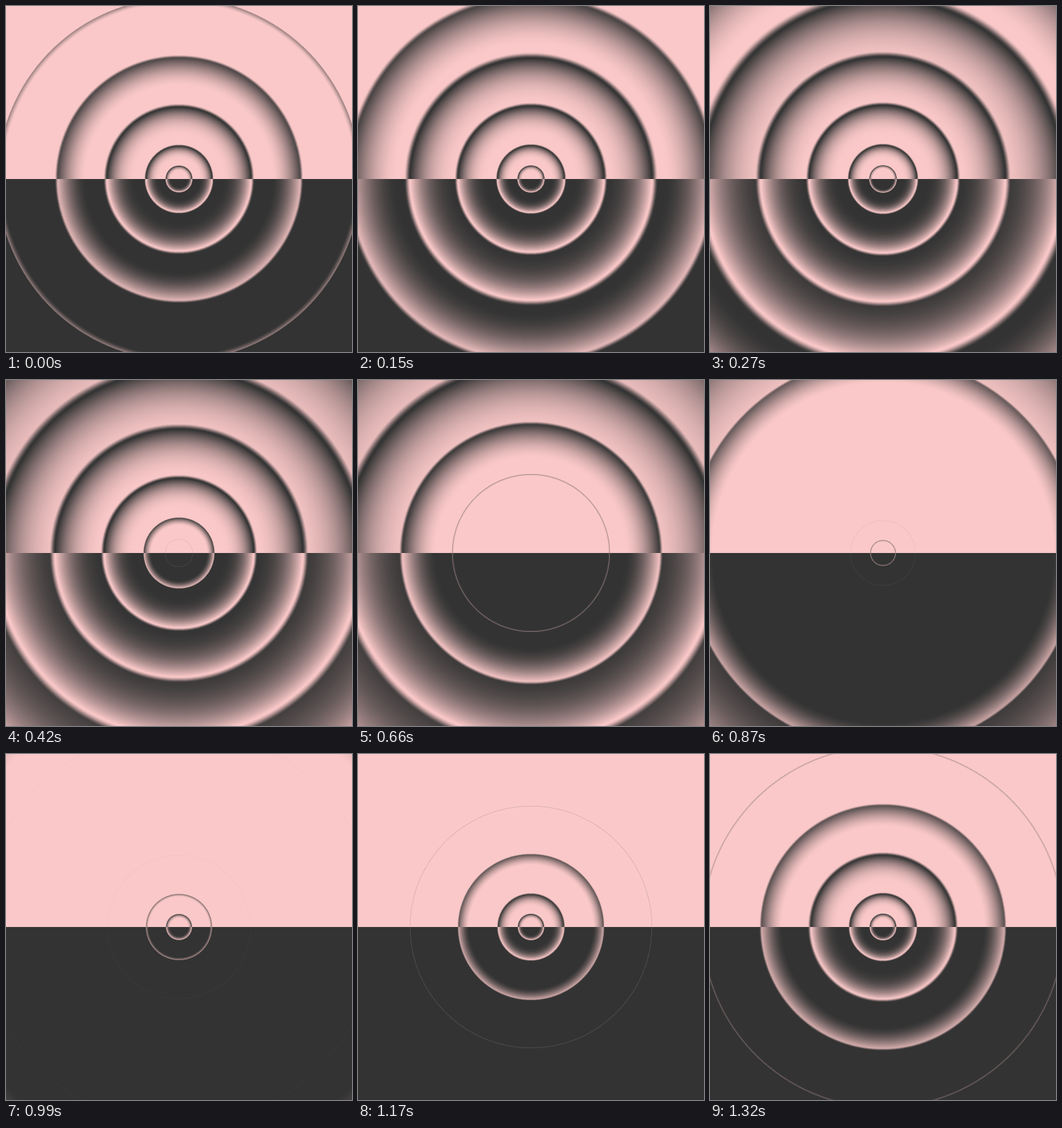
An HTML page with a canvas for the animation above (1350 ms loop, 500x500 px).

```html
<!DOCTYPE html>
<html>
<head>
<meta charset="utf-8">
<style>
html, body { margin: 0; width: 100%; height: 100%; overflow: hidden; background: #333; }
canvas { display: block; }
</style>
</head>
<body>
<canvas id="stage" width="500" height="500"></canvas>
<script>
const SIZE = 500, HALF = SIZE / 2;
const LOOP = 1350, STEP = 30, LIFE = 1080, STAGGER = 135, FIRST_BIRTH = 720;
const RADII = [18.4, 47.2, 103.9, 174.3, 260, 370];
const GROWTH = 0.105;
const PINK = [250, 200, 200], DARK = [51, 51, 51];
const PER_PX = 4, SAMPLES = 8;

const ctx = document.getElementById('stage').getContext('2d');
const image = ctx.createImageData(SIZE, SIZE);
const pixels = new Uint32Array(image.data.buffer);

const clamp = v => Math.min(1, Math.max(0, v));
const smooth = v => { v = clamp(v); return v * v * (3 - 2 * v); };
const easeOut = v => 1 - (1 - clamp(v)) ** 2;
const mix = (a, b, k) => a.reduce(
  (rgb, v, i) => rgb | Math.round(v + (b[i] - v) * k) << (8 * i), 0xff000000) >>> 0;

// Distance table, shared by every picture
const distance = new Uint16Array(SIZE * SIZE);
for (let y = 0; y < SIZE; y++)
  for (let x = 0; x < SIZE; x++)
    distance[y * SIZE + x] = Math.hypot(x + 0.5 - HALF, y + 0.5 - HALF) * PER_PX;
const tableSize = Math.ceil(HALF * Math.SQRT2 * PER_PX) + 1;
const topColors = new Uint32Array(tableSize);
const bottomColors = new Uint32Array(tableSize);

function ringAt(base, index, time) {
  const lead = 27;
  const age = (time - FIRST_BIRTH - index * STAGGER + lead + 2 * LOOP) % LOOP - lead;
  const u = age / LIFE;
  const swell = smooth(u / 0.35) ** 1.4 * clamp((0.955 - u) / 0.22);
  const radius = base * (1 + GROWTH * u + 0.017 * swell);
  return {
    radius,
    inner: Math.max(0.4, radius * swell * 0.42),
    outer: Math.max(0.3, radius * swell * 0.05),
    falloff: 1.5 + 1.3 * swell ** 3,
    strength: easeOut((u + 0.02) / 0.37) * easeOut((1.01 - u) / 0.25)
  };
}

// Soft outer rim, then a long fade towards the centre
function shade(ring, r) {
  const depth = ring.radius - r;
  if (depth <= 0 || depth >= ring.outer + ring.inner) return 0;
  const level = depth < ring.outer
    ? smooth(depth / ring.outer)
    : (1 - (depth - ring.outer) / ring.inner) ** ring.falloff;
  return level * ring.strength;
}

function draw(time) {
  const rings = RADII.map((base, i) => ringAt(base, i, time)).filter(r => r.strength > 0);
  for (let i = 0; i < tableSize; i++) {
    const r = (i + 0.5) / PER_PX;
    let sum = 0;
    for (let s = 0; s < SAMPLES; s++) {
      const sampleR = r + (s + 0.5) / SAMPLES - 0.5;
      let level = 0;
      for (const ring of rings) level = Math.max(level, shade(ring, sampleR));
      sum += level;
    }
    topColors[i] = mix(PINK, DARK, sum / SAMPLES);
    bottomColors[i] = mix(DARK, PINK, sum / SAMPLES);
  }
  const split = pixels.length / 2;
  for (let p = 0; p < pixels.length; p++)
    pixels[p] = (p < split ? topColors : bottomColors)[distance[p]];
  ctx.putImageData(image, 0, 0);
}

const start = performance.now();
let shown = -1;
function tick() {
  const time = Math.floor((performance.now() - start) % LOOP / STEP) * STEP;
  if (time !== shown) draw(shown = time);
  requestAnimationFrame(tick);
}
tick();
</script>
</body>
</html>
```
